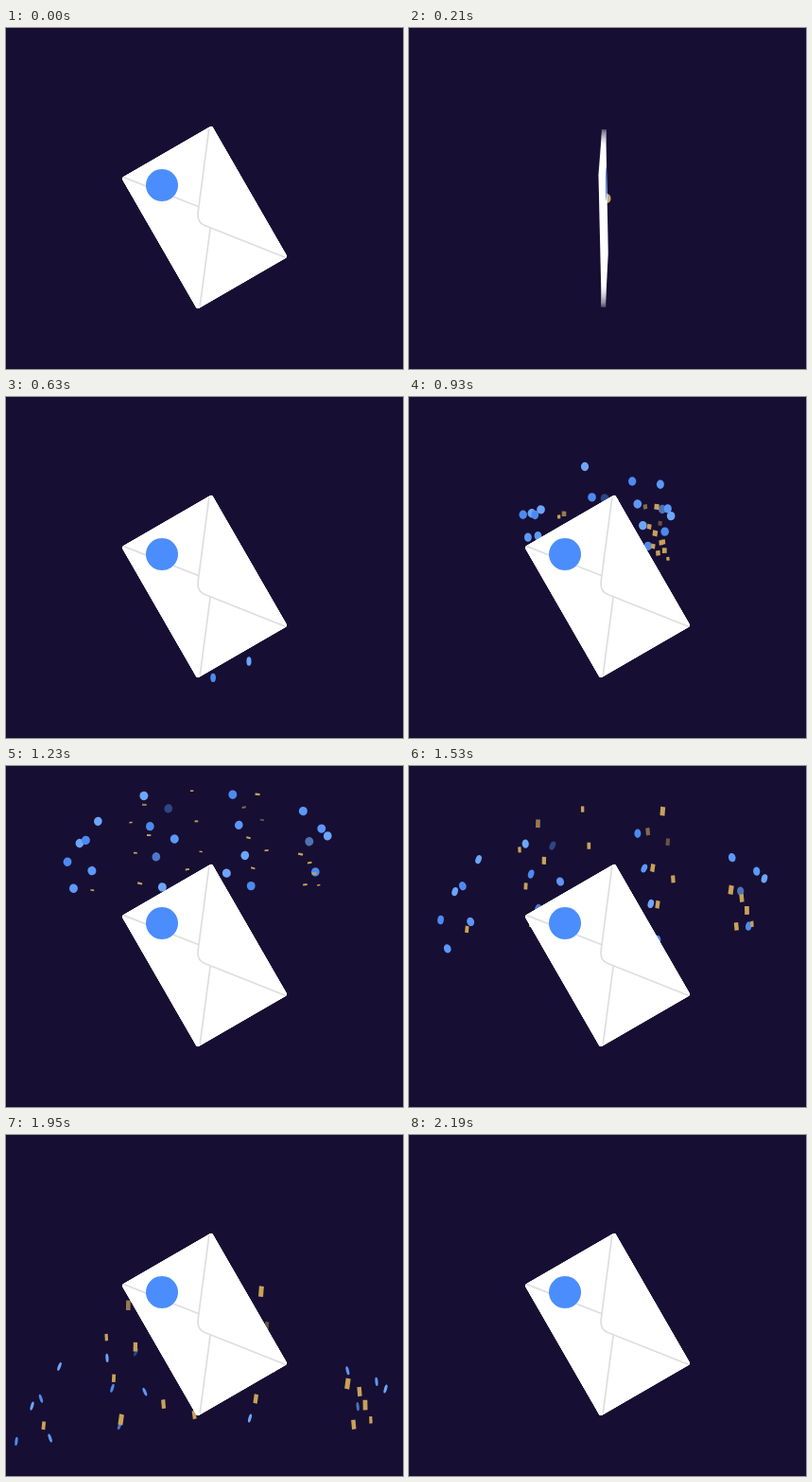
These frames come from a looping animation (420x360 px, 2.67 s). An HTML page with a canvas:

```html
<!DOCTYPE html>
<html lang="en">
<head>
<meta charset="utf-8">
<title>Envelope with confetti</title>
<style>
html, body { margin: 0; width: 100%; height: 100%; overflow: hidden; background: #160f33; }
canvas { display: block; }
</style>
</head>
<body>
<canvas id="stage" width="420" height="360"></canvas>
<script>
const ctx = document.getElementById('stage').getContext('2d');
const LOOP = 2670, SPIN = 603, DEPTH = 1000;
const CX = 210, CY = 200;
const FRONT = -2, BACK = -6;

// Confetti: each piece leaves the envelope's foot and passes its own point at REF
const DOTS = 22, STRIPS = 22, COUNT = DOTS + STRIPS;
const REF = 1230, DRAG = 0.0019, FLOOR = 326, ORIGIN_Y = 300;
const BLUES = ['#6ea5f8', '#4d8af0', '#5d98f8'];

const frac = v => v - Math.floor(v);
const rnd = n => frac(Math.sin(n * 12.9898 + 4.1) * 43758.5453);
const travel = s => (1 - Math.exp(-DRAG * s)) / DRAG;

function makePiece(_, i) {
  const isDot = i < DOTS;
  // Evenly scattered points in an arch, wider for the dots
  const u = frac(0.3 + i * 0.7549), v = frac(0.1 + i * 0.5698);
  const side = 2 * u - 1;
  const x = 212 + side * (isDot ? 165 : 122);
  const y = 20 + 115 * Math.max(v, Math.abs(side) ** 3);

  const start = 612 + 100 * Math.sqrt(i / COUNT);
  const age = REF - start;
  const x0 = 222 + 41 * Math.cos(i * 1.6);
  const sink = isDot ? 0.57 : 0.51;
  return {
    isDot, start, x0, sink,
    end: 1960 + 210 * rnd(i + 7),
    push: (x - x0) / travel(age),
    lift: (ORIGIN_Y + sink * age - y) / travel(age),
    alpha: Math.min(1, 0.4 + 3 * rnd(i + 90)),
    tilt: rnd(i + 30) - 0.5,
    size: 0.75 + 0.5 * rnd(i + 60),
    color: isDot ? BLUES[i % 3] : '#c9a15a'
  };
}
const pieces = Array.from({ length: COUNT }, makePiece);

function drawPiece(p, t) {
  if (t < p.start || t >= p.end) return;
  const s = t - p.start;
  const y = ORIGIN_Y + p.sink * s - p.lift * travel(s);
  if (y > FLOOR) return;

  ctx.save();
  ctx.translate(p.x0 + p.push * travel(s), y);
  ctx.globalAlpha = p.alpha;
  ctx.fillStyle = p.color;
  if (p.isDot) {
    const turn = Math.abs(Math.cos((t - 1150) / 560 + p.tilt * 0.4));
    ctx.rotate(p.tilt * Math.min(1, Math.max(0, (t - 900) / 600)));
    ctx.beginPath();
    ctx.ellipse(0, 0, 4.5 * Math.max(0.35, turn), 4.7, 0, 0, 7);
    ctx.fill();
  } else {
    const turn = Math.abs(Math.sin((t - 1150) / 420));
    const w = 4 * p.size, h = p.size * Math.max(1.4, 9.5 * turn);
    ctx.transform(1, p.tilt * 0.5, -p.tilt * 0.3, 1, 0, 0);
    ctx.fillRect(-w / 2, -h / 2, w, h);
  }
  ctx.restore();
}

function drawEnvelope(angle) {
  const c = Math.cos(angle), s = Math.sin(angle), thin = Math.abs(c);
  const near = c > 0 ? FRONT : BACK;

  const trace = (pts, z) => {
    ctx.beginPath();
    for (const [x, y] of pts) {
      const dx = x - CX;
      const k = DEPTH / (DEPTH + dx * s - z * c);
      ctx.lineTo(CX + (dx * c + z * s) * k, CY + (y - CY) * k);
    }
  };

  // Rounded card: an inset rectangle leaning 30 degrees, widened by its outline
  const corner = ([a, b]) => {
    const cos = Math.cos(Math.PI / 6), sin = 0.5;
    return [CX + a * cos + b * sin, CY - a * sin + b * cos];
  };
  const w = 52.8, h = 77.7;
  const card = [[-w, -h], [w, -h], [w, h], [-w, h]].map(corner);

  ctx.lineJoin = ctx.lineCap = 'round';
  ctx.fillStyle = ctx.strokeStyle = '#fff';
  ctx.lineWidth = 5 * thin;
  for (let z = BACK; z <= FRONT; z++) {
    trace(card, z);
    ctx.closePath();
    ctx.fill();
    ctx.stroke();
  }

  // Folds
  const fold = pts => { trace(pts, near); ctx.stroke(); };
  const bend = Array.from({ length: 13 }, (_, i) => {
    const u = i / 12, v = 1 - u;
    const mix = (a, b, d, e) =>
      v * v * v * a + 3 * v * v * u * b + 3 * v * u * u * d + u * u * u * e;
    return [mix(203.5, 202, 204, 211), mix(192, 201, 206, 208.7)];
  });
  ctx.strokeStyle = '#dedee1';
  ctx.lineWidth = 1.7 * thin;
  fold([[125, 157.8], [203.5, 188.5]]);
  fold([[205.3, 293], [216.2, 211]]);
  fold([[214.7, 107], ...bend, [295, 242]]);

  if (c > 0) {
    const ring = Array.from({ length: 48 }, (_, i) => {
      const a = i * Math.PI / 24;
      return [165 + 17 * Math.cos(a), 166 + 17 * Math.sin(a)];
    });
    trace(ring, 0);
    ctx.fillStyle = '#4b8dfc';
    ctx.fill();
  }
}

function spinAngle(t) {
  const u = Math.min(1, t / SPIN);
  const eased = u < 0.5 ? 2 * u * u : 1 - 2 * (1 - u) ** 2;
  return eased * 2 * Math.PI;
}

function draw(t) {
  ctx.fillStyle = '#160f33';
  ctx.fillRect(0, 0, 420, 360);

  // Confetti waiting behind the card, seen only when the card is edge-on
  if (t < SPIN) {
    ctx.fillStyle = '#c9a97a';
    ctx.beginPath();
    ctx.ellipse(209.5, 180, 4, 5, 0, 0, 7);
    ctx.fill();
  }
  pieces.forEach(p => drawPiece(p, t));
  drawEnvelope(spinAngle(t));
}

const began = performance.now();
function tick() {
  draw((performance.now() - began) % LOOP);
  requestAnimationFrame(tick);
}
tick();
</script>
</body>
</html>
```
